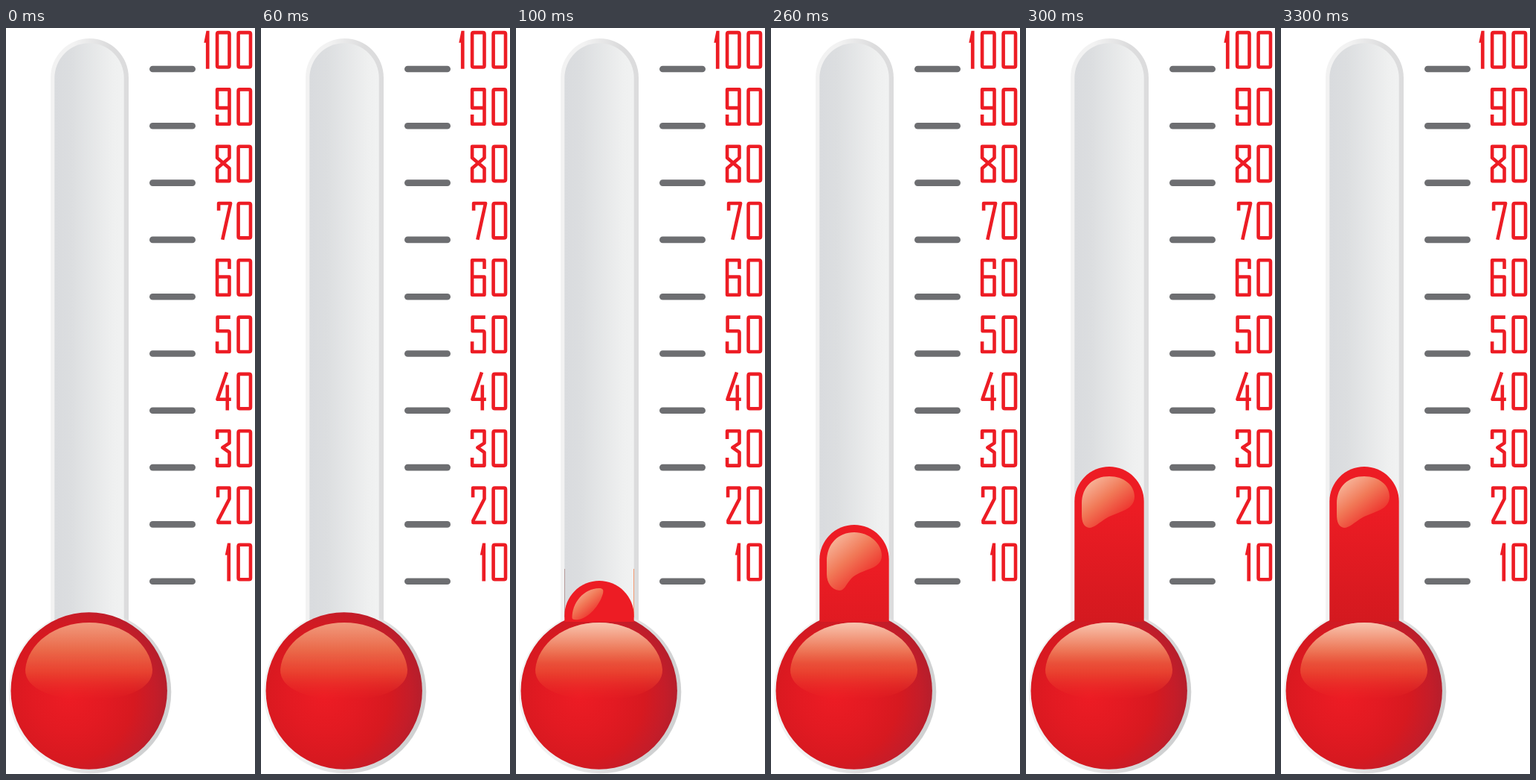
Recreate the animation shown at these times as an HTML page. Size 335 by 1000 pixels, loop 5300 ms.

```html
<!DOCTYPE html>
<html lang="en">
<head>
<meta charset="utf-8">
<title>Thermometer</title>
<style>
  html, body { margin: 0; width: 100%; height: 100%; overflow: hidden; background: #fff; }
  svg { display: block; width: 335px; height: 1000px; }
  .digits path { fill: none; stroke: #ed1c24; stroke-width: 4.6; stroke-linejoin: round; }
  .digits .solid { fill: #ed1c24; stroke: none; }
  .ticks path { stroke: #6d6e71; stroke-width: 8.6; stroke-linecap: round; }

  .stem, .low, .mid, .high, .filled { animation: 5.3s step-end infinite; }
  .stem { animation-name: rise; }
  .low { animation-name: low; }
  .mid { animation-name: mid; }
  .high { animation-name: high; }
  .filled { animation-name: filled; }
  @keyframes rise {
    0% { transform: translateY(800px); }
    1.8868% { transform: translateY(741px); }
    3.7736% { transform: translateY(666px); }
    5.6604%, 100% { transform: translateY(588px); }
  }
  @keyframes low {
    0% { visibility: hidden; }
    1.8868% { visibility: visible; }
    3.7736%, 100% { visibility: hidden; }
  }
  @keyframes mid {
    0% { visibility: hidden; }
    3.7736% { visibility: visible; }
    5.6604%, 100% { visibility: hidden; }
  }
  @keyframes high {
    0% { visibility: hidden; }
    5.6604%, 100% { visibility: visible; }
  }
  @keyframes filled {
    0% { visibility: hidden; }
    1.8868%, 100% { visibility: visible; }
  }
</style>
</head>
<body>
<svg viewBox="0 0 335 1000" role="img" aria-label="Thermometer with a scale from 10 to 100">
  <defs>
    <linearGradient id="rim">
      <stop offset=".3" stop-color="#f2f2f2"/>
      <stop offset=".75" stop-color="#dcdcdd"/>
    </linearGradient>
    <linearGradient id="bulbRim" x1=".15" y1=".3" x2=".9" y2=".5">
      <stop offset=".3" stop-color="#f1f1f1"/>
      <stop offset="1" stop-color="#d0d1d2"/>
    </linearGradient>
    <linearGradient id="glass">
      <stop offset="0" stop-color="#d9dbde"/>
      <stop offset=".25" stop-color="#dcdee0"/>
      <stop offset=".85" stop-color="#eff0f0"/>
      <stop offset="1" stop-color="#f1f2f2"/>
    </linearGradient>
    <radialGradient id="bulb" gradientUnits="userSpaceOnUse" cx="85" cy="895" r="145">
      <stop offset="0" stop-color="#ed1c24"/>
      <stop offset=".35" stop-color="#e21a22"/>
      <stop offset=".6" stop-color="#d71920"/>
      <stop offset=".8" stop-color="#c41d29"/>
      <stop offset="1" stop-color="#aa1f2e"/>
    </radialGradient>
    <linearGradient id="gloss" x2="0" y2="1">
      <stop offset="0" stop-color="#f19a7d"/>
      <stop offset=".35" stop-color="#ea6a4a"/>
      <stop offset=".65" stop-color="#ea4430" stop-opacity=".9"/>
      <stop offset="1" stop-color="#ed2a26" stop-opacity="0"/>
    </linearGradient>
    <linearGradient id="shine" x2="0" y2="1">
      <stop offset="0" stop-color="#fde0d0" stop-opacity=".6"/>
      <stop offset=".7" stop-color="#f8a080" stop-opacity="0"/>
    </linearGradient>
    <linearGradient id="red" gradientUnits="userSpaceOnUse" x1="0" y1="0" x2="0" y2="210">
      <stop offset=".25" stop-color="#ed1c24"/>
      <stop offset="1" stop-color="#d3191f"/>
    </linearGradient>
    <linearGradient id="glint" x1=".15" y1=".1" x2=".75" y2=".85">
      <stop offset="0" stop-color="#f7b398"/>
      <stop offset=".45" stop-color="#f17a58"/>
      <stop offset="1" stop-color="#ed2a27"/>
    </linearGradient>
    <clipPath id="above"><rect width="335" height="796"/></clipPath>
  </defs>

  <path d="M60 830V66.5a52.5 52.5 0 0 1 105 0V830Z" fill="url(#rim)"/>
  <circle cx="113" cy="890" r="109.3" fill="url(#bulbRim)"/>
  <path d="M65.3 830V67a46.7 46.7 0 0 1 93.4 0V830Z" fill="url(#glass)"/>
  <circle cx="111.7" cy="888.5" r="105.2" fill="url(#bulb)"/>

  <g class="low" fill="none">
    <path d="M65.5 725V790" stroke="#b59a98"/>
    <path d="M158.5 725V790" stroke="#f49a72"/>
  </g>
  <g clip-path="url(#above)">
    <path class="stem" d="M65.3 230V46.7a46.7 46.7 0 0 1 93.4 0V230Z" fill="url(#red)"/>
  </g>

  <g fill="url(#glint)">
    <path class="low" d="M75.5 791C75 771 91 751 112 751C117 751 118 753 117 758C113 773 98 791 84 793C79 793.5 76 793 75.5 791Z"/>
    <path class="mid" d="M75 715C75 691 91 676 112 676C132 676 149 691 149 707C149 727 122 724 108 738C100 747 99 754 92 754C81 753 75 743 75 732Z"/>
    <path class="high" d="M75 638C75 614 91 601 112 601C132 601 146 613 146 628C146 646 126 648 110 656C98 663 92 670 85 670C77 669 75 661 75 652Z"/>
  </g>

  <g id="sheen">
    <path d="M26 860C29 825 66 797 112 797S194 825 197 860C198 886 160 901 112 901S25 886 26 860Z" fill="url(#gloss)"/>
    <path class="filled" d="M26 860C29 825 66 797 112 797S194 825 197 860C197 868 190 874 183 874H40C33 874 26 868 26 860Z" fill="url(#shine)"/>
  </g>

  <g class="ticks" id="ticks"></g>
  <g class="digits" id="digits"></g>
</svg>
<script>
  // Condensed numerals, each in a 21 by 51 box
  const glyphs = {
    0: 'M4.3 2.3H16.7Q18.7 2.3 18.7 4.3V46.7Q18.7 48.7 16.7 48.7H4.3Q2.3 48.7 2.3 46.7V4.3Q2.3 2.3 4.3 2.3Z',
    1: 'M20.3 0V51H15.6V16H13L16.2 0Z',
    2: 'M3.3 15V2.3H18.7V17L3.6 46V48.7H21',
    3: 'M2.3 13V2.3H18.7V18.5L9.5 24.5L18.7 31V48.7H2.3V38',
    4: 'M15.2 0L2.6 36.2H21M16 17V51',
    5: 'M20 2.3H2.8V21H16.7Q18.7 21 18.7 23V48.7H2.3V35',
    6: 'M18.7 14V2.3H2.3V48.7H18.7V24.5H2.3',
    7: 'M4.3 12V2.3H20.3L9.5 51',
    8: 'M2.3 2.3H18.7V17.5L2.3 31.5V48.7H18.7V31.5L2.3 17.5Z',
    9: 'M18.7 27H2.3V2.3H18.7V48.7H2.3V36'
  };
  const add = (parent, d, attrs = {}) => {
    const path = document.createElementNS('http://www.w3.org/2000/svg', 'path');
    path.setAttribute('d', d);
    for (const key in attrs) path.setAttribute(key, attrs[key]);
    parent.append(path);
  };
  const ticks = document.getElementById('ticks');
  const digits = document.getElementById('digits');

  for (let i = 0; i < 10; i++) {
    const y = 55 + 76.3 * i;
    add(ticks, `M197.3 ${y}H250.7`);
    [...String(100 - 10 * i)].reverse().forEach((digit, place) => {
      const attrs = { transform: `translate(${310.3 - 28.5 * place} ${y - 51.2})` };
      if (digit === '1') attrs.class = 'solid';
      add(digits, glyphs[digit], attrs);
    });
  }
</script>
</body>
</html>
```
